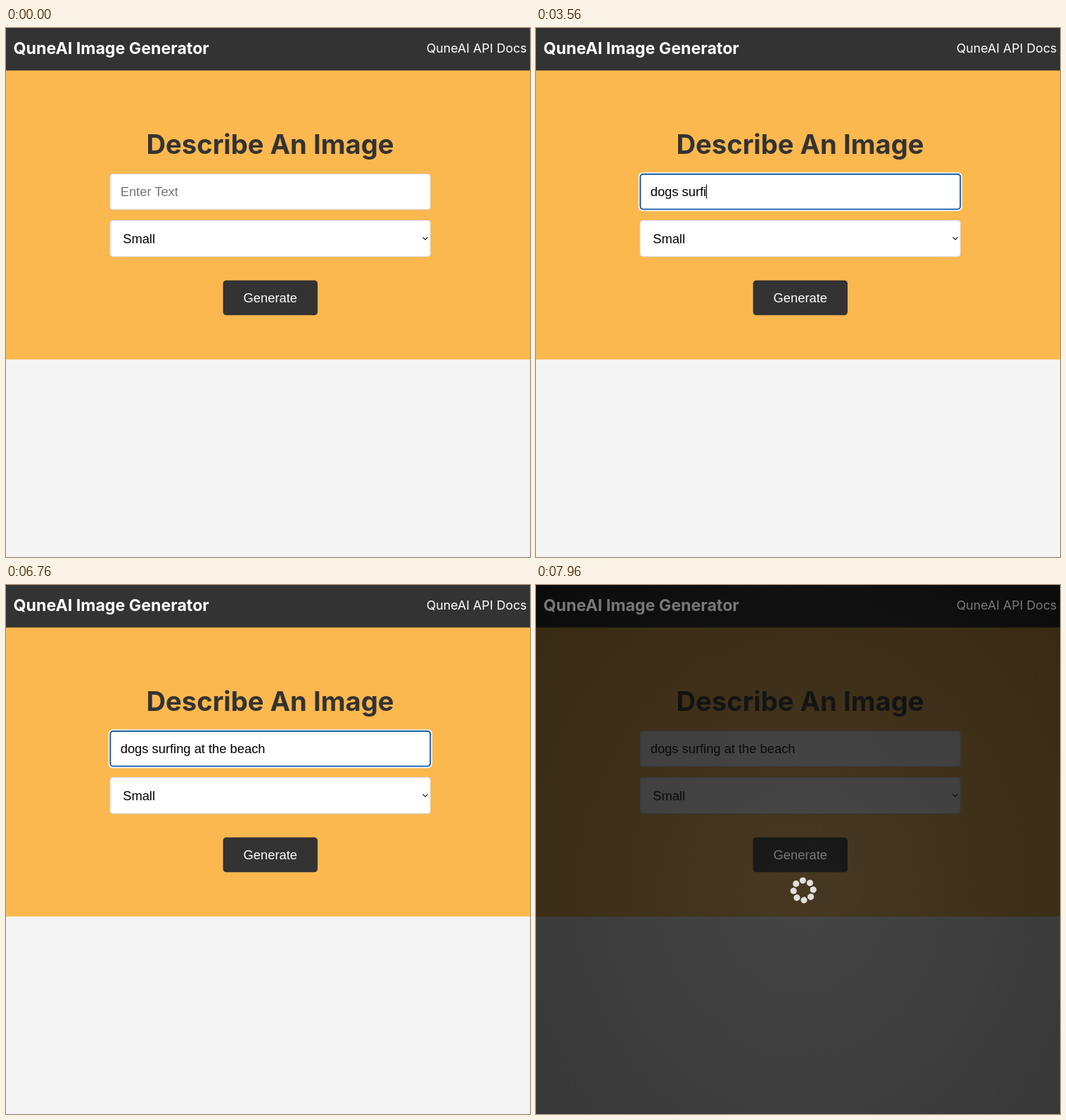
Write an HTML page that moves like this. It is 745x752 px and loops after 8000 ms.

```html
<!DOCTYPE html>
<html lang="en">
<head>
<meta charset="utf-8">
<title>Image Generator</title>
<style>
  html, body { margin: 0; width: 100%; height: 100%; overflow: hidden; background: #f4f4f4; }
  svg { display: block; width: 100%; height: 100%; }
  text { white-space: pre; }
  .brand { font-family: Inter, sans-serif; }
  .form { font: 18.33px "Liberation Sans", Arial, sans-serif; }
  .field { fill: #fff; stroke: #d4d4d4; stroke-width: 1; }
  .bold { font-weight: 700; }
  .heavy { font-weight: 750; }
</style>
</head>
<body>
<svg viewBox="0 0 745 752">
  <defs>
    <radialGradient id="shade" gradientUnits="userSpaceOnUse" r="1"
      gradientTransform="translate(378 434) scale(535 614)" cx="0" cy="0">
      <stop offset="0" stop-color="#141414"/>
      <stop offset="1" stop-color="#000"/>
    </radialGradient>
  </defs>

  <rect width="745" height="752" fill="#f4f4f4"/>
  <rect width="745" height="471.2" fill="#fbb84f"/>
  <rect width="745" height="60.4" fill="#333"/>
  <text class="brand heavy" x="375.5" y="178.5" font-size="38.2" fill="#333" text-anchor="middle">Describe An Image</text>

  <g class="form">
    <rect class="field" x="148" y="207.5" width="455.5" height="50.5" rx="4"/>
    <g id="ring">
      <rect x="145.7" y="205.2" width="460.2" height="55" rx="6" fill="#fff"/>
      <rect x="148.3" y="207.8" width="455" height="49.8" rx="4" fill="#fff" stroke="#0b57a4" stroke-width="1.9"/>
    </g>
    <text id="prompt" x="162.7" y="238.7"></text>
    <rect id="caret" y="222.5" width="1.1" height="20"/>

    <rect class="field" x="148" y="273.5" width="455.5" height="51.5" rx="4"/>
    <text x="166.2" y="305.7">Small</text>
    <path d="M592.5 297.3l3.6 3.6l3.6-3.6" fill="none" stroke="#111" stroke-width="1.2"/>

    <rect id="button" x="-67.2" y="-24.8" width="134.4" height="49.6" rx="4.6" fill="#333"/>
  </g>

  <g id="overlay">
    <rect width="745" height="752" fill="url(#shade)" opacity=".78"/>
    <g id="spinner" fill="#e2dfdb"></g>
  </g>

  <!-- Light labels stay above the overlay, which dims them less than the page. -->
  <g id="labels">
    <g class="brand">
      <text class="heavy" x="10.5" y="37" font-size="23.2">QuneAI Image Generator</text>
      <text x="740.5" y="35.3" font-size="17.8" text-anchor="end">QuneAI API Docs</text>
    </g>
    <g class="form">
      <text id="buttonLabel" y="6.3" text-anchor="middle">Generate</text>
    </g>
  </g>
</svg>

<script>
const LOOP = 8000;
const FOCUS = 760, HOVER = 7120, CLICK = 7480, LOADING = 7520;
const BLINK = 500;
const PROMPT = 'dogs surfing at the beach';
// One key press time per character of PROMPT.
const KEYS = [
  1680, 1920, 2120, 2280, 2400,
  2840, 3000, 3160, 3320, 3480, 3640, 3800, 3960,
  4160, 4560, 4680,
  4840, 5000, 5160, 5240,
  5440, 5640, 5840, 6080, 6240
];

const get = id => document.getElementById(id);
const [ring, prompt, caret, button, buttonLabel, labels, overlay, spinner] =
  ['ring', 'prompt', 'caret', 'button', 'buttonLabel', 'labels', 'overlay', 'spinner'].map(get);
const show = (node, visible) => node.setAttribute('visibility', visible ? 'visible' : 'hidden');

for (let i = 0; i < 8; i++) {
  const dot = document.createElementNS('http://www.w3.org/2000/svg', 'circle');
  const angle = i * Math.PI / 4;
  dot.setAttribute('cx', 14 * Math.cos(angle));
  dot.setAttribute('cy', 14 * Math.sin(angle));
  dot.setAttribute('r', 4.6);
  spinner.append(dot);
}

function draw(t) {
  const typed = KEYS.filter(key => key <= t).length;
  const focused = t >= FOCUS && t < CLICK;
  const loading = t >= LOADING;
  const lastInput = typed ? KEYS[typed - 1] : FOCUS;

  prompt.textContent = typed ? PROMPT.slice(0, typed) : 'Enter Text';
  prompt.setAttribute('fill', typed ? '#000' : '#757575');
  show(ring, focused);
  show(caret, focused && (t - lastInput) % (2 * BLINK) < BLINK);
  caret.setAttribute('x', 162.4 + (typed ? prompt.getComputedTextLength() : 0));

  const scale = t >= HOVER && !loading ? 1.1 : 1;
  for (const part of [button, buttonLabel]) {
    part.setAttribute('transform', `translate(375.8 383.5) scale(${scale})`);
  }

  labels.setAttribute('fill', loading ? '#787878' : '#fff');
  show(overlay, loading);
  const turn = 86.4 * (t - LOADING) / 440;
  spinner.setAttribute('transform', `translate(380.2 434) rotate(${turn})`);
}

const start = performance.now();
function tick() {
  draw((performance.now() - start) % LOOP);
  requestAnimationFrame(tick);
}
tick();
</script>
</body>
</html>
```
